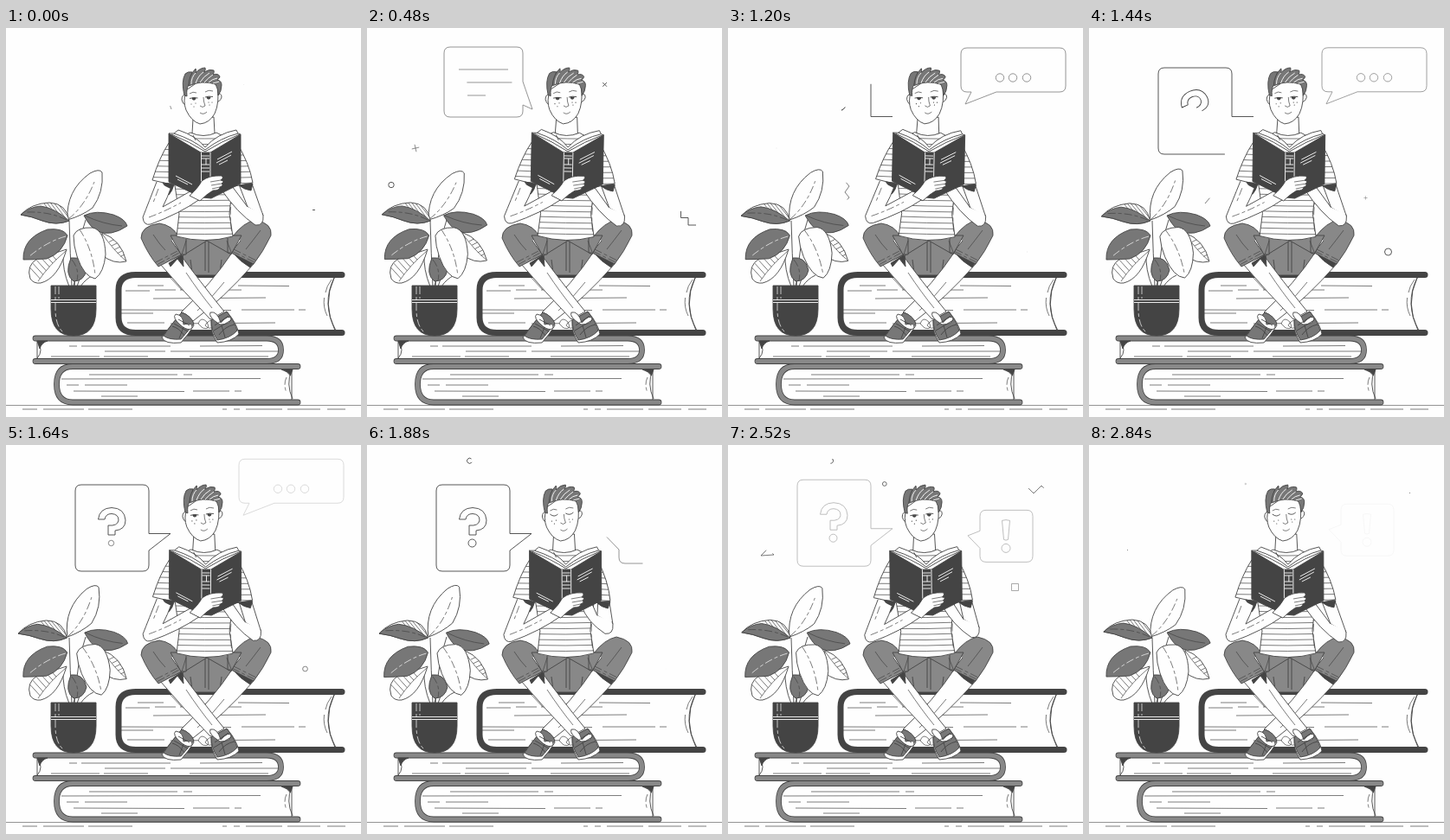
An HTML page for the animation above (2.88 s loop, 410 by 450 pixels).

```html
<!DOCTYPE html>
<html lang="en">
<head>
<meta charset="utf-8">
<title>Reading on a stack of books</title>
<style>
html, body { margin: 0; width: 100%; height: 100%; overflow: hidden; background: #fefefe; }
svg { display: block; width: 410px; height: 450px; }
path, circle, rect { stroke: #444; stroke-width: .9; fill: none; stroke-linejoin: round; }
.w { fill: #fefefe; }
.g { fill: #888; }
.m { fill: #777; }
.d { fill: #444; }
.light { stroke: #fefefe; }
.thin { stroke-width: .7; }
.soft { stroke: #888; }
.dash { stroke-dasharray: 9 3 4 3; }
.cover { stroke-width: 6.8; stroke-linecap: round; }
.coverFill { stroke-width: 5.2; stroke: #888; stroke-linecap: round; }
.dots circle { fill: #444; stroke: none; }
</style>
</head>
<body>
<svg viewBox="0 0 410 450">
  <defs>
    <clipPath id="shirtClip"><path d="M213 121L240 121L268 134L262 185L258 215L262 241Q230 250 197 241L200 215L195 182L169 176Q177 150 188 133Z"/></clipPath>
    <clipPath id="sleeveClip"><path d="M266 132Q281 156 285 179L264 183Z"/></clipPath>
    <clipPath id="leafClipA"><path d="M73 223Q70 203 50 202L38 204Q58 210 73 223Z"/></clipPath>
    <clipPath id="leafClipB"><path d="M28 289Q24 276 36 268L69 258Q52 272 37 293Z"/></clipPath>
    <clipPath id="leafClipC"><path d="M113 238Q133 246 139 270Q127 262 113 238Z"/></clipPath>
  </defs>

  <path class="soft" d="M0 436.5H410"/>
  <path class="thin" d="M19 441H36M43 441H90M95 441H146M250 441H255M263 441H270M277 441H319M325 441H363M371 441H392"/>

  <!-- books -->
  <g>
    <path class="w" stroke="none" d="M388 286H150Q130 286 130 304V335Q130 352 150 352H388L380 350Q365 319 379 289Z"/>
    <path d="M379 289Q364 319 381 350"/>
    <path class="thin" d="M376 291Q370 299 369 306M367.500 312Q366 323 371 333"/>
    <path class="thin" d="M152 298H182M268 298L327 298.500M138 304H166M172 303H196M201 303H272M170 313L300 312M133 326L260 326.500M272 326H333M338 326H346M133 330H170M190 342L311 341M140 341H183"/>
    <path style="stroke-width:7;stroke-linecap:round" d="M388 285.500H150Q130 285.500 130 303V335Q130 352.500 150 352.500H388"/>
  </g>
  <g>
    <path class="w" stroke="none" d="M36 360H300Q317 360 317 372Q317 385 300 385H36Z"/>
    <path class="cover" d="M34 359H301Q317.500 359 317.500 372.500Q317.500 385.500 301 385.500H34"/>
    <path class="coverFill" d="M34 359H301Q317.500 359 317.500 372.500Q317.500 385.500 301 385.500H34"/>
    <path d="M36 362Q44 373 36 382"/><path class="d" d="M36 362H48Q41 364 39 371Z"/>
    <path class="thin" d="M73 368H82M87 368H190M224 368L296 367.500M114 374H184M190 374H314M52 380H108M113 380H164M212 380H303"/>
  </g>
  <g>
    <path class="w" stroke="none" d="M330 392H76Q58 392 58 412Q58 433 76 433H330Z"/>
    <path class="cover" d="M337 391.500H77Q58.500 391.500 58.500 412Q58.500 433 77 433H337"/>
    <path class="coverFill" d="M337 391.500H77Q58.500 391.500 58.500 412Q58.500 433 77 433H337"/>
    <path d="M330 395Q323 412 331 429"/><path class="d" d="M318 395H331L328.500 402Q325 397 318 395Z"/>
    <path class="thin" d="M96 401H198M205 401H215M64 406L294 405.500M70 413H84M91 413H140M78 420L206 420.500M216 420H258M264 420H272M110 426H152"/>
    <path class="dash thin" d="M324 404Q320 412 324 422"/>
  </g>

  <!-- plant -->
  <path d="M76 299Q74 260 73 223M79 299Q82 250 92 222M73 299Q65 280 66 260M82 299L92 270M78 299L81 284M86 299Q92 290 101 286"/>
  <g id="leafTop"><path class="w" d="M71 222Q69 188 97 168Q108 162 111 167Q113 190 100 208Q88 217 71 222Z"/><path class="thin dash" d="M72 221Q91 206 102 178"/></g>
  <g id="leafLeft">
    <path class="w" d="M73 223Q70 203 50 202Q29 203 17 216Q30 218 42 223Q58 229 73 223Z"/>
    <path class="thin" clip-path="url(#leafClipA)" d="M38 195L59 223M42 195L63 223M46 195L67 223M50 195L71 223M54 195L75 223M58 195L79 223M62 195L83 223"/>
    <path class="m" d="M73 223Q56 208 40 206Q27 207 17 216Q30 218 42 223Q58 229 73 223Z"/>
    <path class="thin dash" d="M70 222Q50 212 24 213"/>
  </g>
  <g id="leafRight">
    <path class="m" d="M90 217Q104 210 124 216Q138 221 140 229Q121 242 105 235Q97 230 90 217Z"/>
    <path class="thin" d="M91 217Q112 227 134 229"/>
    <path class="w" d="M111 237Q133 245 139 270Q124 274 110 262Z"/>
    <path class="thin" d="M111 238Q125 258 138 269"/>
    <path class="thin" clip-path="url(#leafClipC)" d="M110 252L138 238M112 257L140 243M114 262L142 248M116 267L144 253M119 271L147 257"/>
  </g>
  <path class="w" d="M28 290Q23 275 36 267L70 256Q60 290 40 295Q32 296 28 290Z"/>
  <path class="thin" d="M69 258Q50 274 37 293"/>
  <path class="thin" clip-path="url(#leafClipB)" d="M23 272L43 294M28 269L48 291M33 266L53 288M38 263L58 285M43 260L63 282M48 257L68 279"/>
  <g id="leafMid">
    <path class="m" d="M20 268Q19 243 48 233Q66 231 71 240Q66 260 47 267Q32 268 20 268Z"/>
    <path class="light thin dash" d="M69 241Q47 247 26 265"/>
  </g>
  <path class="m" d="M75 266Q89 264 93 280Q90 293 78 293Q67 285 75 266Z"/><path class="thin dash" d="M76 268Q85 279 82 292"/>
  <g id="leafFront">
    <path class="w" d="M78 240Q82 230 100 231Q114 234 115 262Q113 283 103 290Q90 288 82 264Q78 252 78 240Z"/>
    <path class="thin dash" d="M85 233Q100 256 103 286"/>
  </g>
  <path class="d" d="M52 298H104V325Q104 356 78 356Q52 356 52 325Z"/>
  <path class="light" d="M52 314.500H104M52 317.500H104"/>
  <path class="light thin dash" d="M57 299V325Q57 344 66 352M61 299V313"/>

  <!-- legs -->
  <path class="g" d="M196 240Q230 250 264 240L262 265L247 286H215L200 262Z"/>
  <path d="M230 246V281M234 246V283M213 268L215 283M249 268L247 283"/>
  <path class="w" d="M261 260Q238 295 202 329L216 339Q252 312 286 273Z"/>
  <path class="thin" d="M252 294Q239 311 221 327"/>
  <path class="d" d="M262 260L290 265L282 277Q270 270 262 260Z"/>
  <path class="w" d="M178 273Q206 306 236 337L252 328Q223 292 202 263Z"/>
  <path class="thin" d="M208 283Q224 307 238 324M188 287L203 303"/>
  <path class="d" d="M188 272L204 262L205 276L198 267L190 276Z"/>
  <path class="g" stroke="none" d="M198 240L232 246L203 264ZM264 240L232 246L260 262Z"/>
  <path class="g" d="M199 241Q192 228 177 226Q156 229 156 243Q164 262 176 276L203 262Q196 254 191 246"/>
  <path class="g" stroke="none" d="M190 240H208V262L202 262Z"/>
  <path class="g" d="M262 241Q274 225 288 222Q308 226 306 240Q297 259 286 273L260 260Q266 252 271 246"/>
  <path class="g" stroke="none" d="M272 240H256V260L261 260Z"/>
  <path class="thin dash" d="M173 271L200 257M175 273.500L201 259.500M263 256L289 269M261.500 258.500L287 271"/>
  <path class="thin" d="M170 239Q177 250 184 257M294 234Q285 246 277 256M208 246L203 262M255 246L260 259"/>
  <path class="w thin" d="M222 342Q225 333 232 340Q237 350 227 347ZM232 341Q241 333 240 345Q235 350 230 344Z"/>
  <g>
    <path class="w" d="M203 329Q190 344 180 358Q183 366 202 364Q211 354 217 344Q214 333 203 329Z"/>
    <path class="m" d="M203 329Q190 344 182 356Q188 361 202 360Q210 351 217 342Q214 333 203 329Z"/>
    <path class="w" d="M203 345Q191 335 196 331Q205 332 205 343Q216 340 215 347Q211 351 203 345Z"/>
    <path d="M194 342L210 351M199 337L212 344M205 346L200 359M192 345Q200 347 206 356"/>
  </g>
  <g>
    <path class="w" d="M237 338Q236 352 244 364Q261 363 269 354Q267 342 255 328Z"/>
    <path class="m" d="M237 338Q237 350 244 361Q259 359 267 350Q265 342 255 328Z"/>
    <path class="w" d="M247 343Q233 334 236 329Q244 327 248 341Q257 331 260 336Q260 343 247 343Z"/>
    <path d="M240 350L260 338M241 344L257 333M249 344L253 358M246 355Q253 345 264 343"/>
  </g>

  <!-- upper body -->
  <g id="upper">
    <path class="w" d="M216 105L215 122Q228 131 241 122L240 103Z"/>
    <path id="rightArm" class="w"/>
    <g id="rightSleeve">
      <path class="w" d="M266 132Q281 156 285 179L264 183Z"/>
      <path class="thin" data-stripes clip-path="url(#sleeveClip)"/>
      <path class="d" d="M269 182L285 180L283 188Q275 187 269 182Z"/>
    </g>
    <path class="w" d="M213 121Q228 128 243 121L268 134L262 185Q259 200 258 215L262 241Q230 250 197 241L200 215L195 182L169 176Q177 150 188 133Z"/>
    <path class="thin" data-stripes clip-path="url(#shirtClip)"/>
    <path class="thin dash" d="M262 188Q257 215 261 238"/>
    <path class="d" d="M181 179L194 181Q192 189 188 193Q186 185 181 179Z"/>
    <path id="rightForearm" class="w"/>
    <path class="w" d="M174 178Q165 201 158 219Q159 229 167 227Q200 215 224 198L218 186L181 207Q187 195 190 186"/>
    <path class="thin dash" d="M165 219Q184 212 202 202M176 186L170 202"/>
    <path class="d" d="M188 122L225 143H236L271 123V180L237 197L226 196L188 178Z"/>
    <path class="w" d="M188 122L194 122L199 118Q220 125 230 138Q244 122 266 118L268 122L271 123L236 144H225Z"/>
    <path d="M194 122Q216 129 230 141Q248 127 268 122M191 123Q213 132 230 143Q249 131 270 123M216 124L219 130"/>
    <path class="light" d="M225.500 144V195M236 144V178M226 148H235M226 151H235M226 158H235M226 162H235M226 166H235M231 151V158M244 152L261 143M243 156L260 147M246 158L256 153M196 171L215 181M198 175L210 181"/>
    <path class="w" d="M212 194Q222 185 226 177Q235 170 249 171Q252 173 248 176Q253 177 249 180Q252 182 247 184Q247 188 239 188Q232 192 224 200Z"/>
    <path class="thin" d="M236 178L248 176M237 182L249 180M238 186L247 184"/>
    <path class="w" d="M208 77Q203 77 203 83Q205 90 209 89M243 77Q249 74 249 80Q247 86 243 85"/>
    <path class="w" d="M208 72Q204 85 208 95Q214 108 224 111Q235 110 241 99Q247 86 244 66L228 58Z"/>
    <path class="m" d="M206 78Q202 62 207 53Q210 50 215 51L211 66Q208 70 209 79Z"/>
    <path class="m" d="M211 67Q211 55 219 47Q220 49 219 52Q224 46 230 46Q231 48 229 51Q235 47 240 49Q241 51 239 54Q245 52 247 56Q247 58 244 60Q249 61 249 66Q249 73 245 78Q245 70 242 65Q226 60 211 67Z"/>
    <path class="light" d="M214 65Q214 57 219 52M219 64Q222 55 228 51M224 63Q228 56 235 52M229 63Q233 58 239 54M234 63Q238 59 244 58M239 64L246 62"/>
    <path class="thin" d="M212 76Q216 73 220 75M230 74Q234 71 239 73M228 80Q228 85 230 90Q227 93 224 90M224 98Q228 101 232 97"/>
    <path id="lids"/>
    <path id="pupils" class="d" stroke="none" d="M215 81A2 2.200 0 0 0 219 81ZM232 80A2 2.200 0 0 0 236 80Z"/>
    <g class="dots">
      <circle cx="214" cy="88" r=".6"/><circle cx="217" cy="91" r=".6"/><circle cx="219" cy="87" r=".6"/><circle cx="235" cy="89" r=".6"/><circle cx="238" cy="86" r=".6"/><circle cx="234" cy="86" r=".6"/>
    </g>
  </g>
  <g id="effects"></g>
</svg>
<script>
const LOOP = 2880;
const NEVER = [LOOP + 1, LOOP + 2];
const $ = id => document.getElementById(id);
const clamp = x => Math.min(1, Math.max(0, x));
const ramp = (t, a, b) => clamp((t - a) / (b - a));
const smooth = (t, a, b) => { const p = ramp(t, a, b); return p * p * (3 - 2 * p); };
const wave = (t, start) => Math.sin((t - start) / LOOP * 2 * Math.PI);

let stripes = '';
for (let y = 127; y < 244; y += 6.5) stripes += `M165 ${y}Q230 ${y + 2} 292 ${y}`;
document.querySelectorAll('[data-stripes]').forEach(el => el.setAttribute('d', stripes));

function add(parent, tag, attrs) {
  const el = document.createElementNS('http://www.w3.org/2000/svg', tag);
  for (const key in attrs) el.setAttribute(key, attrs[key]);
  return parent.appendChild(el);
}

// Each updater sets one element from the loop time.
const updaters = [];

function trimmed(parent, d, draw, erase = NEVER, cls = '') {
  const el = add(parent, 'path', { d, class: cls, pathLength: 1 });
  updaters.push(t => {
    const from = smooth(t, ...erase), to = smooth(t, ...draw);
    el.style.display = to - from > .002 ? '' : 'none';
    el.style.strokeDasharray = to > .999 && !from ? 'none' : `0 ${from} ${to - from} 2`;
  });
  return el;
}

function popping(parent, tag, attrs, x, y, grow, shrink = NEVER, turn = 0) {
  const el = add(parent, tag, attrs);
  updaters.push(t => {
    const size = smooth(t, ...grow);
    el.setAttribute('transform', `translate(${x} ${y}) rotate(${turn * (1 - size)}) scale(${size * (1 - smooth(t, ...shrink))})`);
  });
}

function bubble(d, draw, leave, rise, cls) {
  const group = add($('effects'), 'g', {});
  updaters.push(t => {
    const p = ramp(t, ...leave);
    group.setAttribute('transform', `translate(0 ${-rise * p * p})`);
    group.style.opacity = 1 - p;
  });
  trimmed(group, d, draw, NEVER, cls);
  return group;
}

// Text bubble: lines slide into place one after another.
const notes = bubble('M191 94L180 62V29Q180 22 173 22H96Q89 22 89 29V96Q89 103 96 103H173Q180 103 180 96V89L191 94', [-30, 450], [700, 1180], 15, 'soft');
for (let i = 0; i < 3; i++) {
  const line = add(notes, 'path', { class: 'soft' });
  updaters.push(t => {
    const start = 150 + i * 110;
    const len = 57 * smooth(t, start, start + 270);
    const x = 106 + 10 * (1 - smooth(t, start + 180, start + 450)) * (i > 0);
    const y = 44 + 15 * i + 4 * (1 - smooth(t, 480, 720));
    line.setAttribute('d', `M${x} ${y}h${len}`);
  });
}

const typing = bubble('M274 88L310 74H383Q390 74 390 67V30Q390 23 383 23H276Q269 23 269 30V67Q269 74 276 74H281L274 88', [600, 1080], [1400, 1760], 15, 'soft');
[314, 329, 345].forEach((x, i) => popping(typing, 'circle', { r: 4.7, class: 'soft' }, x, 57.5, [780 + i * 130, 920 + i * 130]));

const question = bubble('M190 102.500H165V53Q165 46 158 46H87Q80 46 80 53V139Q80 146 87 146H158Q165 146 165 139V122L190 102.500', [1080, 1560], [2260, 2680], 15);
const hook = trimmed(question, 'M126 99Q138 98 138 87Q137 73 122 72.500Q108 73 106.500 86H114Q115 79.500 122 79.500Q130 80 130 87Q129 94 118 93V104H126V99', [1150, 1560]);
updaters.push(t => hook.setAttribute('transform', `rotate(${-28 * (1 - smooth(t, 1380, 1640))} 121 87)`));
popping(question, 'circle', { r: 4.5 }, 121.5, 113.5, [1500, 1720]);

const alert = bubble('M277 106.500L291 121V130Q291 137 298 137H345Q352 137 352 130V84Q352 77 345 77H298Q291 77 291 84V101L277 106.500', [1680, 2300], [2280, 2880], 10, 'soft');
trimmed(alert, 'M316.500 89Q321 87.500 325.500 89L323.500 111Q321 112.500 318.500 111Z', [1930, 2180], NEVER, 'soft');
popping(alert, 'circle', { r: 5, class: 'soft' }, 321, 121, [2000, 2190]);

// Small drifting marks.
const fx = $('effects');
popping(fx, 'path', { d: 'M-2.300 -2.300L2.300 2.300M-2.300 2.300L2.300 -2.300' }, 274.6, 65.4, [-80, 320], [540, 800]);
popping(fx, 'path', { d: 'M-5.500 0H5.500M0 -5.500V5.500', class: 'thin' }, 56, 139, [200, 600], [960, 1260], -60);
popping(fx, 'circle', { r: 3.2 }, 28, 181.5, [220, 460], [580, 840]);
trimmed(fx, 'M354 210.500H362.500V219.500H371V228H380', [-90, 480], [330, 820]);
trimmed(fx, 'M140 171L135 177L140 183L135 190L140 196L134 203', [720, 1350], [1000, 1620], 'thin');
popping(fx, 'path', { d: 'M-2.500 0H2.500M0 -2.500V2.500', class: 'thin soft' }, 319.5, 196.5, [1180, 1400], [1360, 1680]);
popping(fx, 'circle', { r: 4 }, 345.5, 259, [1160, 1400], [1480, 1940]);
trimmed(fx, 'M120.500 16A3 3 0 1 0 120.500 20.500A3 3 0 0 0 120.500 16', [1700, 1960], [2360, 2640]);
trimmed(fx, 'M43 118L53 127L38 128L46 120L44 122', [2100, 2640], [2330, 2900], 'thin');
trimmed(fx, 'M335 56L344 47L353 56L362 47L371 56', [2080, 2680], [2280, 2900], 'thin');
popping(fx, 'rect', { x: -5, y: -5, width: 10, height: 10, class: 'soft' }, 331.5, 164.5, [1960, 2200], [2440, 2720]);
popping(fx, 'circle', { r: 2.8 }, 180.8, 45, [2340, 2580], [2640, 2950]);

const rotate = (id, angle, x, y) => $(id).setAttribute('transform', `rotate(${angle} ${x} ${y})`);

function pose(t) {
  rotate('upper', 1.1 * (wave(t, 170) - wave(0, 170)), 232, 245);
  rotate('leafTop', 2.8 * (wave(t, -260) - wave(0, -260)), 73, 224);
  rotate('leafLeft', 1.2 * (wave(t, -400) - wave(0, -400)), 74, 298);
  rotate('leafMid', .7 * wave(t, 0), 74, 298);
  rotate('leafRight', -1.2 * wave(t, 0), 80, 298);
  rotate('leafFront', -2.2 * (wave(t, 720) + 1), 95, 190);

  // The right elbow lifts towards the body and settles again.
  const bend = Math.sin(ramp(t, 1480, 2780) * Math.PI) ** 2;
  const ex = 297 - 19 * bend, ey = 228 - 14 * bend;
  rotate('rightSleeve', 7 * bend, 266, 134);
  $('rightArm').setAttribute('d', `M${284 - 6 * bend} 180L${ex} ${ey - 11}L${ex - 18} ${ey - 21}L${269 - 3 * bend} 181Z`);
  $('rightForearm').setAttribute('d',
    `M${ex - 1} ${ey - 14}L${ex} ${ey - 11}Q${ex + 1} ${ey + 1} ${ex - 9} ${ey}Q${ex - 30} ${ey - 14} 248 186L258 179L${ex - 18} ${ey - 21}`);

  const closed = t > 1700 && t < 2020 || t > 2700;
  $('lids').setAttribute('d', closed
    ? 'M212 80Q217 84 221 80M230 79Q235 82 239 78'
    : 'M212 81.500Q217 80 221.500 81M230 80Q234 78.500 239 79.500');
  $('pupils').style.display = closed ? 'none' : '';
}

function frame() {
  const t = performance.now() % LOOP;
  pose(t);
  updaters.forEach(update => update(t));
  requestAnimationFrame(frame);
}
frame();
</script>
</body>
</html>
```
